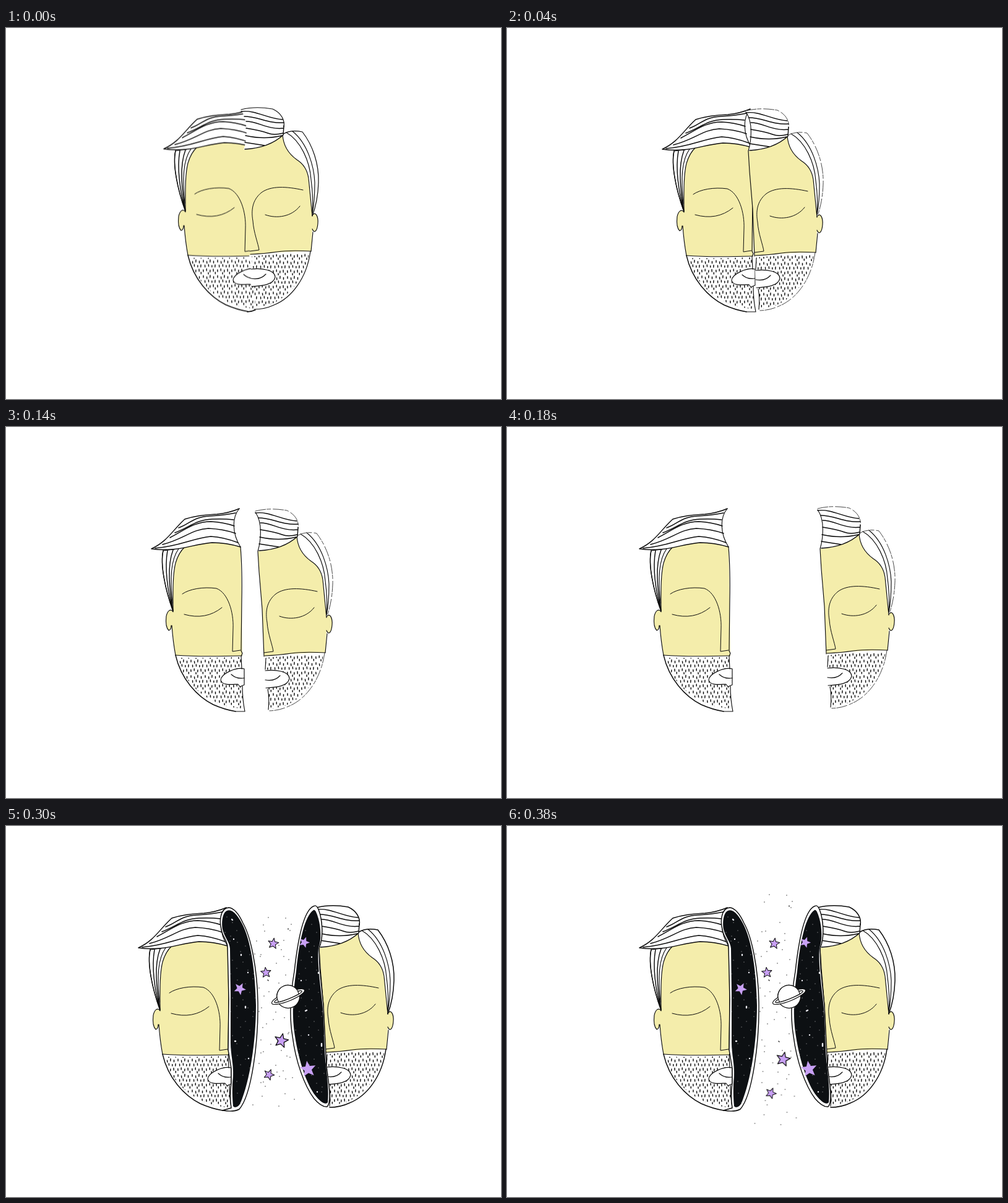
Animation, 800 px wide and 600 px high, one loop 0.4 s. Source, as an HTML page without scripts:

```html
<!DOCTYPE html>
<html lang="en">
<head>
<meta charset="utf-8">
<title>Open mind</title>
<style>
  html, body { margin: 0; width: 100%; height: 100%; overflow: hidden; background: #fff; }
  svg { display: block; width: 100vw; height: 100vh; }
  .ink { fill: none; stroke: #0c0c0c; stroke-width: 1.15; stroke-linecap: round; stroke-linejoin: round; }
  .bold { stroke-width: 1.45; }
  .thin { stroke-width: 1; }
  .white { fill: #fff; }
  .skin { fill: #f4edab; }
  .night { fill: #0d1013; }
  .star { fill: #c8a0f4; }
  .dots { fill: none; stroke: #222; stroke-width: 1.4; stroke-linecap: round; }
  .glow { fill: none; stroke: #e8e8ee; stroke-width: 2.4; stroke-linecap: round; }

  .left, .right, .seam, .cut, .rim, .space, .up, .down { animation: 400ms step-end infinite; }
  .left { animation-name: left; }
  .right { animation-name: right; }
  .seam { animation-name: seam; }
  .cut { animation-name: cut; }
  .rim { animation-name: rim; }
  .space { animation-name: space; }
  .up { animation-name: up; }
  .down { animation-name: down; }

  @keyframes left {
    0% { transform: translate(41px, -1.5px); }
    10% { transform: translate(37px, -1px); }
    25% { transform: translate(32px, 0); }
    35% { transform: translate(21px, 0); }
    45%, 100% { transform: none; }
  }
  @keyframes right {
    0% { transform: translate(-122px, 0); }
    10% { transform: translate(-116px, 2px); }
    25% { transform: translate(-110px, 4px); }
    35% { transform: translate(-99px, 4px); }
    45%, 100% { transform: none; }
  }
  @keyframes seam {
    0% { visibility: visible; }
    10%, 100% { visibility: hidden; }
  }
  @keyframes cut {
    0% { visibility: hidden; }
    10%, 100% { visibility: visible; }
  }
  @keyframes rim {
    0% { stroke-dasharray: none; stroke: #0c0c0c; stroke-width: 1.2; }
    10% { stroke-dasharray: 17 2 6 4; stroke: #333; stroke-width: .9; }
    60%, 100% { stroke-dasharray: none; stroke: #0c0c0c; stroke-width: 1.5; }
  }
  @keyframes space {
    0% { visibility: hidden; }
    60%, 100% { visibility: visible; }
  }
  @keyframes up {
    0% { transform: none; }
    70% { transform: translateY(-18px); }
    82.5% { transform: translateY(-37px); }
    95%, 100% { transform: translateY(-55px); }
  }
  @keyframes down {
    0% { transform: none; }
    70% { transform: translate(1px, 15px); }
    82.5% { transform: translate(2px, 30px); }
    95%, 100% { transform: translate(2.5px, 45px); }
  }
</style>
</head>
<body>
<svg viewBox="0 0 800 600">
  <defs>
    <pattern id="stubble" width="23" height="25" patternUnits="userSpaceOnUse">
      <path class="ink bold" d="M2 2v3M7.5 4l.3 3M13 1.5l-.2 3.5M18.5 3.5v3M4.5 10l.2 3M10.3 9l.2 3M15.8 10.5v2.5M21 9.5l-.2 3.5M1.8 17.5l.2 3M7.2 16v3M12.9 18l-.2 3M18 16.5l.2 3.5M10 22l.1 2.5M21.3 21.5v2.5"/>
    </pattern>
    <pattern id="specks" width="37" height="61" patternUnits="userSpaceOnUse">
      <path d="M4 5h0M17 11h0M29 3h0M9 20h0M24 25h0M33 34h0M13 37h0M3 47h0M21 50h0M30 56h0" fill="none" stroke="#ddd" stroke-width="1.1" stroke-linecap="round"/>
    </pattern>
    <path id="star" d="M0-10 2.6-3.4 9.6-3 4.2 1.6 6 8.6 0 4.8-6.2 8 -4.2 1.4-9.6-3.4-2.6-3.4Z"/>
    <path id="nightL" d="M357 137C350 140 348 155 350 167C353 180 361 187 362 198L363 270 363 350C363 370 368 385 367 405C365 425 366 440 367 453C370 457 376 454 379 448C394 412 404 350 404 290C403 240 397 192 384 163C376 146 366 133 357 137Z"/>
    <path id="nightR" d="M497 136C483 145 474 185 469 235C463 275 462 310 467 340C473 380 486 418 500 436C508 446 516 452 520 447C522 430 519 405 517 385C514 365 515 320 511 285C507 250 503 220 505 197C510 185 509 165 505 150C502 140 500 135 497 136Z"/>
    <clipPath id="clipR"><use href="#nightR"/></clipPath>
  </defs>

  <g class="left">
    <path class="skin" d="M262 196Q310 178 358 194L360 290 361 371 253 370 247 321Q246 327 242 329C238 325 237 315 238 306C240 297 245 293 249 299C249 260 249 215 262 196Z"/>
    <path class="ink" d="M249 299C245 293 240 297 238 306C237 315 238 325 242 329Q246 328 246 321M247 321Q249 348 253 369"/>
    <path class="white" d="M253 369Q290 372 361 370L360 392 365 460C310 458 262 418 253 369Z"/>
    <path fill="url(#stubble)" d="M256 373Q290 374 359 372L360 392 362 455C312 454 266 418 256 373Z"/>
    <path class="ink bold" d="M253 369C262 408 288 436 314 449Q332 457 350 460"/>
    <path class="ink" d="M253 369Q290 372 360 370"/>
    <path class="ink white" d="M233 200C228 222 236 262 249 298C249 270 248 240 253 220Q258 203 268 194L250 198Z"/>
    <path class="ink bold" d="M233 200C228 222 236 262 249 298M240 200C235 228 240 265 249 297M249 199C239 225 243 262 249 297"/>
    <path class="ink" d="M258 197C245 215 244 245 248 285"/>
    <path class="white" d="M214 197C240 185 248 167 268 149Q290 142 320 141 340 139 356 132C344 146 344 172 358 194Q335 187 312 187C278 190 255 203 214 197Z"/>
    <path class="ink bold" d="M358 194Q335 187 312 187C278 190 255 203 214 197C240 185 248 167 268 149Q290 142 320 141 340 139 356 132M258 163C274 158 282 145 308 144Q330 143 350 139M252 171C276 162 286 150 312 149Q330 148 347 150M244 179C270 165 285 153 310 153Q330 154 348 160M232 190C265 182 280 165 306 164Q330 165 350 172M220 196C260 193 280 180 310 177Q330 178 354 187"/>
    <path class="ink thin" d="M264 270C275 262 298 258 319 261C338 268 347 300 346 325L345 363 358 361M267 303Q302 313 328 292"/>
    <path class="ink white" d="M364 391C350 388 327 399 326 409C328 419 345 416 354 416L357 420 364 417Z"/>
    <path class="ink" d="M343 400Q351 408 364 406"/>
    <path class="cut ink" d="M356 132C344 146 344 172 358 194Q361 230 360 280L359 362 361 366 359 371 360 391M361 419Q361 440 365 460L350 460"/>
  </g>

  <g class="right">
    <path class="skin" d="M506 197Q545 195 570 172C570 190 578 203 592 213Q608 223 611 245L617 303C622 295 627 305 626 316C625 329 620 333 617 325L615 362 560 363 516 367 513 290Z"/>
    <path class="ink" d="M617 303C622 295 627 305 626 316C625 329 620 333 617 325M618 330L615 361"/>
    <path class="white" d="M515 367Q560 362 615 361C609 405 583 437 555 448Q540 455 523 455L522 418 518 390Z"/>
    <path fill="url(#stubble)" d="M519 369Q560 365 612 364C606 402 580 434 552 446L525 453 523 418Z"/>
    <path class="rim ink" d="M614 361C608 405 583 437 555 448Q540 455 523 455"/>
    <path class="seam ink bold" d="M512 459Q518 459 525 456"/>
    <path class="ink" d="M517 366Q540 365 560 362T615 361"/>
    <path class="white" d="M569 172Q582 164 601 168C618 190 628 220 627 250Q626 280 617 304L611 245Q608 223 592 213C578 203 570 190 569 172Z"/>
    <path class="ink" d="M617 304L611 243Q608 223 592 213C578 203 570 190 569 172M575 169C598 182 613 215 615 245Q619 275 617 300M585 167C610 187 620 225 621 250Q621 280 617 300"/>
    <path class="rim ink" d="M569 172Q582 164 601 168C618 190 628 220 627 250Q626 280 617 304"/>
    <path class="white" d="M502 132Q525 126 553 131C566 137 573 148 571 160L570 173Q547 194 506 197C511 183 515 155 502 132Z"/>
    <path class="rim ink" d="M502 132Q525 126 553 131C566 137 573 148 571 160"/>
    <path class="ink bold" d="M571 158L570 173Q547 194 508 196M502 135C525 132 545 147 569 148M507 143C530 143 545 155 571 153M510 151C530 151 545 165 571 162M510 162Q535 166 545 170T570 170M509 174Q540 181 568 174M508 185L540 190"/>
    <path class="ink thin" d="M602 262C575 256 550 255 535 266C520 278 518 295 521 312C522 330 530 350 531 359L516 361M541 302C560 309 584 305 597 288"/>
    <path class="white" d="M517 390C535 388 557 391 557 403C554 416 535 417 518 418Z"/>
    <path class="ink" d="M518 390C535 388 557 391 557 403C554 416 535 417 519 418M518 405Q533 408 542 398"/>
    <path class="cut ink" d="M502 134C514 150 511 180 506 197L508 230 513 290 516 367M519 370L518 388M522 420Q525 435 523 453"/>
  </g>

  <g class="space">
    <path class="ink bold white" d="M360 132C345 133 345 157 348 167C350 180 358 185 358 196L360 280 359 362 364 392 364 416Q361 435 364 456L350 460Q368 463 377 458C397 435 408 350 407 285C406 230 396 180 383 157Q372 133 360 132Z"/>
    <path class="ink bold white" d="M499 129C482 133 472 180 466 235C459 275 458 310 463 340C468 380 482 420 498 441Q510 455 519 454 525 448 522 420L518 388 516 350 513 290 507 230 506 197C514 180 511 150 505 135Q502 128 499 129Z"/>
    <use href="#nightL" class="night"/>
    <use href="#nightR" class="night"/>
    <use href="#nightL" fill="url(#specks)"/>
    <use href="#nightR" fill="url(#specks)"/>
    <path class="glow" d="M365 151l1 1M380 208v1M370 348h1M387 292v2M391 237h0M368 183h0M392 376h0M484 299l2-1M494 212h0M505 237v1M477 250h0M503 430h0M489 338h0M510 352v4"/>

    <use href="#star" class="star" transform="translate(378 263) rotate(28)"/>
    <use href="#star" class="star" transform="translate(488 393) rotate(-8) scale(1.35)"/>
    <g clip-path="url(#clipR)"><use href="#star" class="star" transform="translate(482 188) rotate(20) scale(.9)"/></g>

    <path class="dots" d="M418 170h0M449 185h0M405 186h0M445 200h0M411 211h0M457 216h0M437 222h0M402 207h0M452 241h0M423 249l1 1M409 262h0M441 254h0M417 275h0M425 268h0M413 294h0M409 300h0M436 301h0M450 310h0M421 320h0M432 313h0M456 336h0M412 346h0M439 348l1 1M416 365h0M445 363h0M459 374h0M409 384h0M438 398h0M452 409h0M412 415h0"/>
    <g class="up">
      <path class="dots" d="M424 166h0M452 167h0M461 177h0M456 184v1M459 187h0M416 178h0M441 211h0M412 226h0M449 229h0M420 258h0"/>
    </g>
    <g class="down">
      <path class="dots" d="M414 311h0M456 319h0M427 338h0M411 352h0M453 357h0M435 372h0M447 381h0M415 399h0M441 390h0M462 392h0M418 406h0M450 418h0M413 422h0M465 427h0M440 438h0M398 436h0"/>
      <use href="#star" class="ink star" transform="translate(444 332) rotate(12) scale(1.15)"/>
      <use href="#star" class="ink star" transform="translate(424 387) rotate(22) scale(.88)"/>
    </g>
    <use href="#star" class="ink star" transform="translate(432 190) rotate(8) scale(.88)"/>
    <use href="#star" class="ink star" transform="translate(420 237) rotate(-6) scale(.86)"/>

    <g class="ink" transform="translate(456 276) rotate(-22)">
      <circle class="white" r="18.5"/>
      <ellipse class="white" rx="28.5" ry="7"/>
      <ellipse class="white" rx="24" ry="3.5"/>
      <path class="white" d="M-17.5 2.4A17.8 17.8 0 1 1 17.5 2.4Q0 4.6-17.5 2.4Z"/>
    </g>
  </g>
</svg>
</body>
</html>
```
